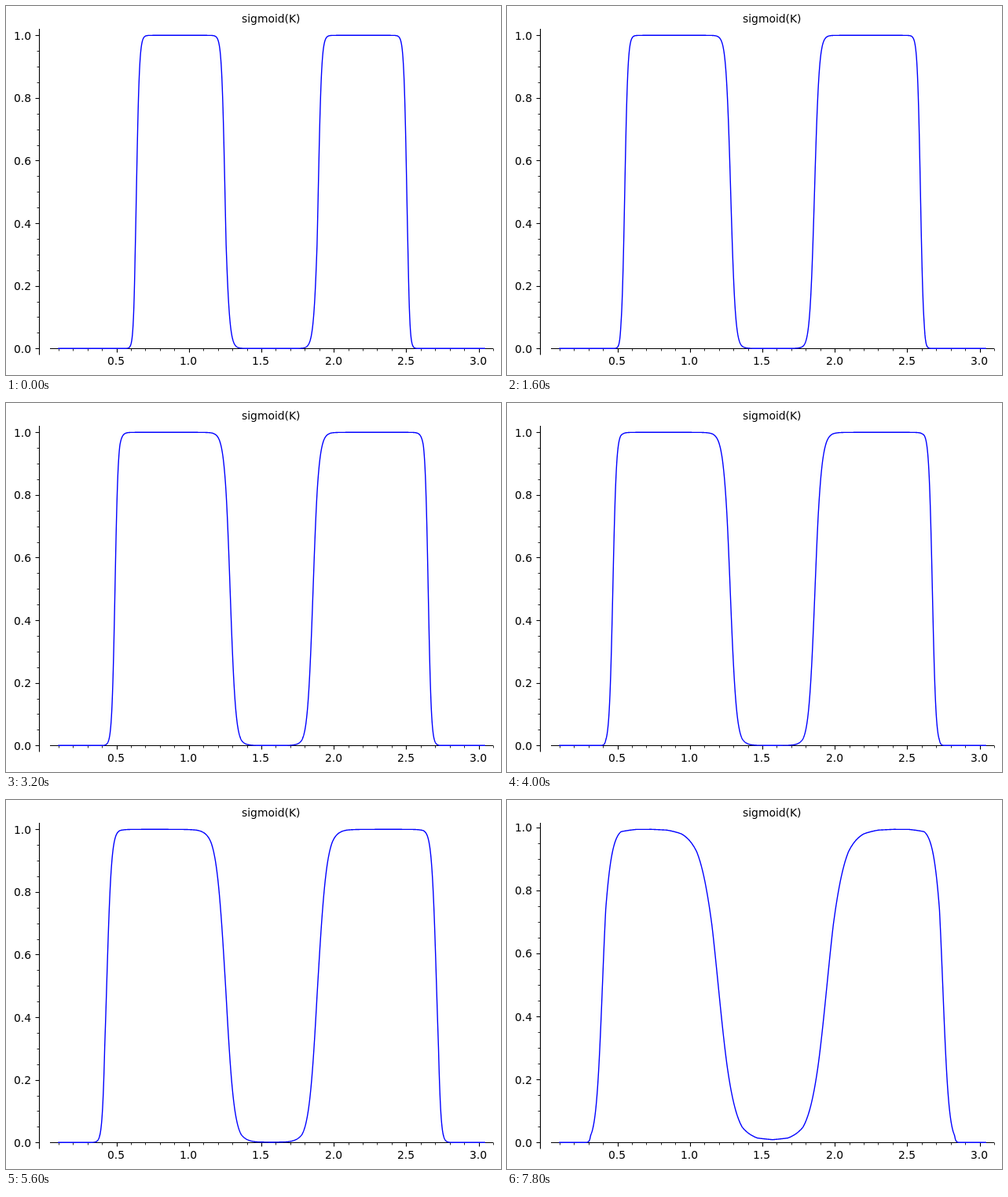
Animation, 630 px wide and 469 px high, one loop 8000 ms. Source, as an HTML page:

```html
<!DOCTYPE html>
<html lang="en">
<head>
<meta charset="utf-8">
<title>sigmoid(K)</title>
<style>
  html, body { margin: 0; width: 100%; height: 100%; overflow: hidden; background: #fff; }
  svg { display: block; }
  text { font: 13.89px "DejaVu Sans", sans-serif; fill: #000; }
  path { fill: none; stroke: #000; stroke-width: 1.11; }
  .minor { stroke-width: 0.83; }
  .curve { stroke: #00f; stroke-width: 1.39; stroke-linejoin: round; stroke-linecap: square; }
</style>
</head>
<body>
<svg id="plot" width="630" height="469" viewBox="0 0 630 469"></svg>
<script>
const LOOP = 8000, STEP = 200, LAST = LOOP - STEP;
const X0 = 48.45, X_UNIT = 184.35, Y0 = 435.3, HEIGHT = 398;
const KNOT = Math.PI / 30, MIDDLE = 15;
const svg = document.getElementById('plot');

function add(tag, attrs, text = '') {
  const node = document.createElementNS(svg.namespaceURI, tag);
  for (const name in attrs) node.setAttribute(name, attrs[name]);
  node.textContent = text;
  svg.appendChild(node);
  return node;
}
const line = (d, kind = 'major') => add('path', { d, class: kind });
const label = (x, y, text) => add('text', { x, y }, text);
const quarterSine = u => Math.sin(u * Math.PI / 2);

// The logit is a wave over the knots: a steep drop towards the pole,
// a skewed hump between two moving zeros, and a dip at the middle.
function waveAt(s) {
  const outer = 3.4 + 2.68 * Math.exp(-s / 0.54);
  const inner = 11.9 + 2.35 * s - 4 * s ** 2 + 1.2 * s ** 3;
  const crest = 7 + 2 * (1 - s) ** 2;
  const peak = 5.05 + 13 * (1 - s * s) ** 1.3;
  const dip = 13.5 - 8.8 * s;
  const steepness = 11 - 7 * s * s;
  const bend = 1.9 + 2.1 * s ** 5;
  return k => {
    if (k < outer) return -steepness * (outer - k) - 1.1 * (outer - k) ** 4;
    if (k < crest) return peak * (1 - ((crest - k) / (crest - outer)) ** bend);
    if (k < inner) return peak * quarterSine((inner - k) / (inner - crest));
    return -dip * quarterSine((k - inner) / (MIDDLE - inner));
  };
}

// The wave is known at whole knots only and joined by straight pieces.
function sigmoidAt(wave, x) {
  const pos = Math.max(Math.min(x, Math.PI - x) / KNOT, 1);
  const k = Math.min(Math.floor(pos), MIDDLE - 1);
  const logit = wave(k) + (wave(k + 1) - wave(k)) * (pos - k);
  return 1 / (1 + Math.exp(-logit));
}

label(300, 21, 'sigmoid(K)');
line('M42.5 29V443.5');
line('M56 435.5H620');
for (let i = 1; i <= 31; i++) {
  const x = X0 + X_UNIT * i / 10, major = i % 5 === 0;
  line(`M${Math.round(x) + 0.5} 435.5v${major ? 5 : 3}`, major ? 'major' : 'minor');
  if (major) label(Math.floor(x - 11.04), 456, (i / 10).toFixed(1));
}

const yTicks = Array.from({ length: 21 }, (_, i) => {
  const value = i / 20, major = i % 4 === 0;
  return {
    value,
    length: major ? 5 : 3,
    mark: line('', major ? 'major' : 'minor'),
    text: major ? label(10, 0, value.toFixed(1)) : null
  };
});
const curve = line('', 'curve');

function draw(t) {
  const wave = waveAt(t / LAST);
  const points = [];
  for (let i = 0, n = 1200; i <= n; i++) {
    const x = 0.1 + (Math.PI - 0.2) * i / n;
    points.push([x, sigmoidAt(wave, x)]);
  }
  const scale = HEIGHT / Math.max(...points.map(p => p[1]));
  curve.setAttribute('d', 'M' + points.map(([x, y]) =>
    (X0 + X_UNIT * x).toFixed(2) + ',' + (Y0 - scale * y).toFixed(2)).join('L'));
  for (const { value, length, mark, text } of yTicks) {
    const y = Y0 - scale * value;
    mark.setAttribute('d', `M42.5 ${Math.round(y) + 0.5}h${-length}`);
    if (text) text.setAttribute('y', Math.ceil(y + 5));
  }
}

const start = performance.now();
let shown = -1;
function tick() {
  const t = Math.floor((performance.now() - start) % LOOP / STEP) * STEP;
  if (t !== shown) draw(shown = t);
  requestAnimationFrame(tick);
}
tick();
</script>
</body>
</html>
```
